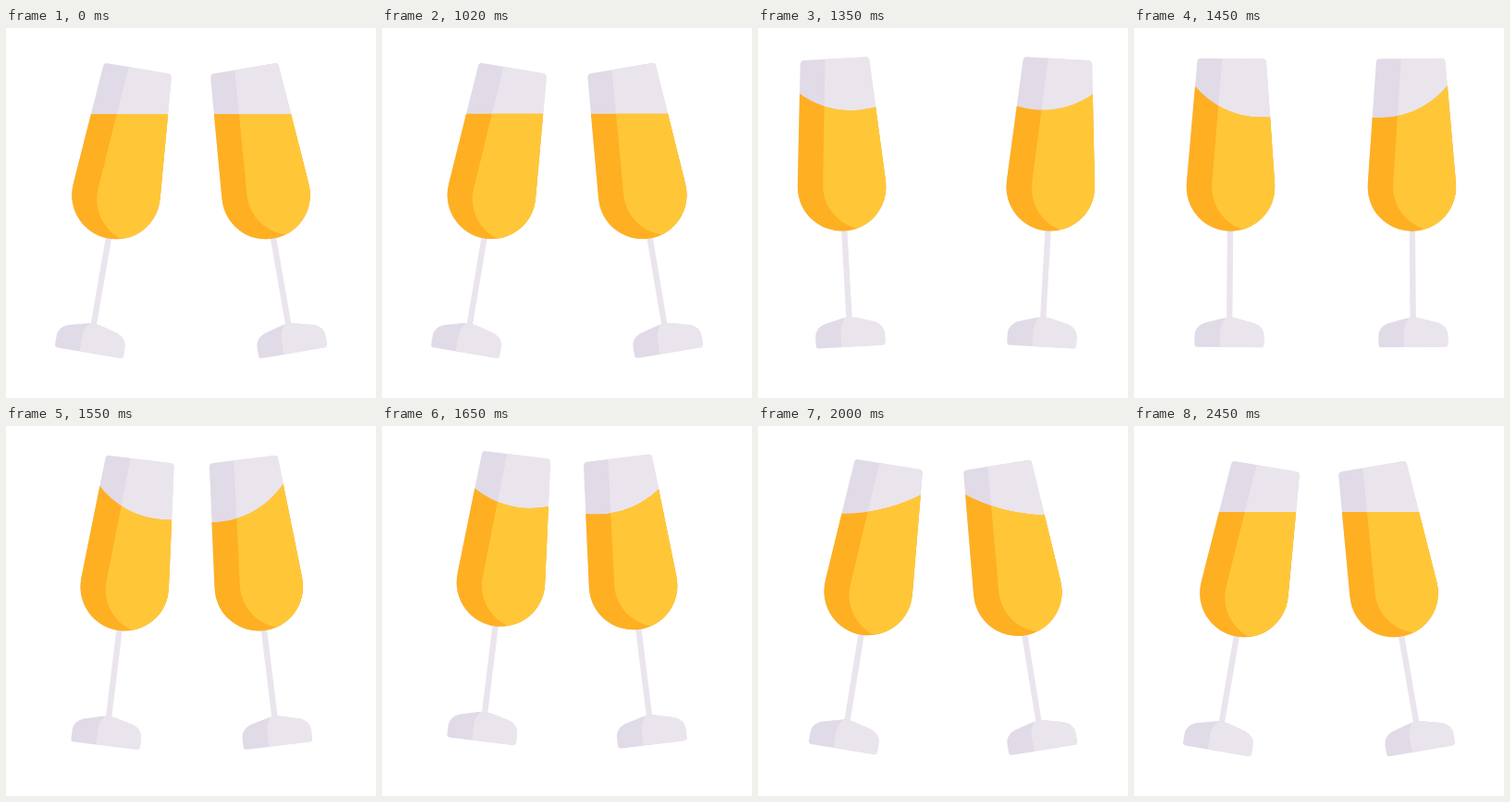
An HTML page that plays this animation: 400x400 px, repeating every 2520 ms.

```html
<!DOCTYPE html>
<html lang="en">
<head>
<meta charset="utf-8">
<title>Cheers</title>
<style>
  html, body { margin: 0; width: 100%; height: 100%; overflow: hidden; background: #fff; }
  svg { display: block; width: 100vw; height: 100vh; }
</style>
</head>
<body>
<svg id="stage" viewBox="0 0 400 400"></svg>
<script>
const LOOP = 2520, START = 1020, END = 2450;
const GLASS = '#eae5ed', GLASS_DARK = '#e1dae7';
const WINE = '#ffc738', WINE_DARK = '#ffaf22';

// One glass, upright, with its origin at the middle of the foot.
const BOWL = 'M-33-312H33Q37.2-312 37.4-308L47.7-176.3A47.8 47.8 0 1 1-47.7-176.3L-37.4-308Q-37.2-312-33-312Z';
const LIT = 'M-10.2-313L-20.2-176.3A47.8 47.8 0 0 0 27.5-125.4H80V-313Z';
const FOOT = 'M-34 0Q-37.5 0-37.5-3.5V-12Q-37.5-22-27-26L-7-31.3Q0-33 7-31.3L27-26Q37.5-22 37.5-12V-3.5Q37.5 0 34 0Z';
const FOOT_LIT = 'M-10 1V-16Q-10-26-2-34H40V1Z';

const glassMarkup = id => `
  <g id="${id}">
    <rect x="-3.2" y="-130" width="6.4" height="102" fill="${GLASS}"/>
    <path d="${FOOT}" fill="${GLASS_DARK}"/>
    <path d="${FOOT_LIT}" fill="${GLASS}" clip-path="url(#foot)"/>
    <path d="${BOWL}" fill="${GLASS_DARK}"/>
    <g clip-path="url(#bowl)">
      <path d="${LIT}" fill="${GLASS}"/>
      <path class="wine" fill="${WINE_DARK}"/>
      <g clip-path="url(#lit)"><path class="wine" fill="${WINE}"/></g>
    </g>
  </g>`;

const clip = (id, d) => `<clipPath id="${id}"><path d="${d}"/></clipPath>`;
document.getElementById('stage').innerHTML =
  `<defs>${clip('bowl', BOWL)}${clip('lit', LIT)}${clip('foot', FOOT)}</defs>` +
  glassMarkup('left') + glassMarkup('right');

const smooth = u => u * u * (3 - 2 * u);
const speedUp = u => u * u;
const slowDown = u => u * (2 - u);
const part = (t, from, to) => Math.min(1, Math.max(0, (t - from) / (to - from)));
const mix = (a, b, u) => a + (b - a) * u;

// Both glasses share one motion, mirrored by side, with small differences.
const glasses = [
  { id: 'left', side: 1, backX: 99.6, liftY: 337.2, lag: -8, peak: 26 },
  { id: 'right', side: -1, backX: 92.2, liftY: 343.3, lag: 8, peak: 28.6 }
];

const REST = [89.5, 351.2, 9.8];
for (const g of glasses) {
  g.el = document.getElementById(g.id);
  g.fills = g.el.querySelectorAll('.wine');
  // start, end, pose reached [x, y, angle], easing
  g.moves = [
    [1000, 1260, [g.backX, 344.6, -4.3], smooth],
    [1260, 1585, [109.3, 345.9, 9.8], speedUp],
    [1585, 1770, [105.8, g.liftY, 5], slowDown],
    [1770, 2065, REST, smooth]
  ];
}

const pose = (g, t) => g.moves.reduce(
  (p, [from, to, next, ease]) => {
    const u = ease(part(t, from, to));
    return p.map((v, i) => mix(v, next[i], u));
  }, REST);

// The wine rocks in half waves: in, out, in, out, still.
function slosh(g, t) {
  const waves = [[1020, 0], [1190, -6], [1530, g.peak], [1900, -17.5], [2276, 5], [END, 0]];
  return waves.reduce((v, [time, next], i) =>
    i ? mix(v, next, smooth(part(t - g.lag, waves[i - 1][0], time))) : next, 0);
}

function draw(time) {
  const t = time < START || time >= END ? 0 : time;
  const sag = 9.5 * (smooth(part(t, 1020, 1300)) - smooth(part(t, 1550, 2420)));
  for (const g of glasses) {
    const [x, y, angle] = pose(g, t), tilt = slosh(g, t);
    const top = sag / 3 + tilt * 0.18, d = 4 * sag;
    g.el.setAttribute('transform',
      `translate(${200 + g.side * (x - 200)} ${y}) rotate(${g.side * angle})`);
    for (const f of g.fills) {
      f.setAttribute('transform', `translate(0 -262) rotate(${g.side * (tilt - angle)})`);
      f.setAttribute('d', `M-82 ${top - d}Q0 ${top + d} 82 ${top - d}L140 200H-140Z`);
    }
  }
}

let began;
function tick(now) {
  began ??= now;
  draw((now - began) % LOOP);
  requestAnimationFrame(tick);
}
draw(0);
requestAnimationFrame(tick);
</script>
</body>
</html>
```
